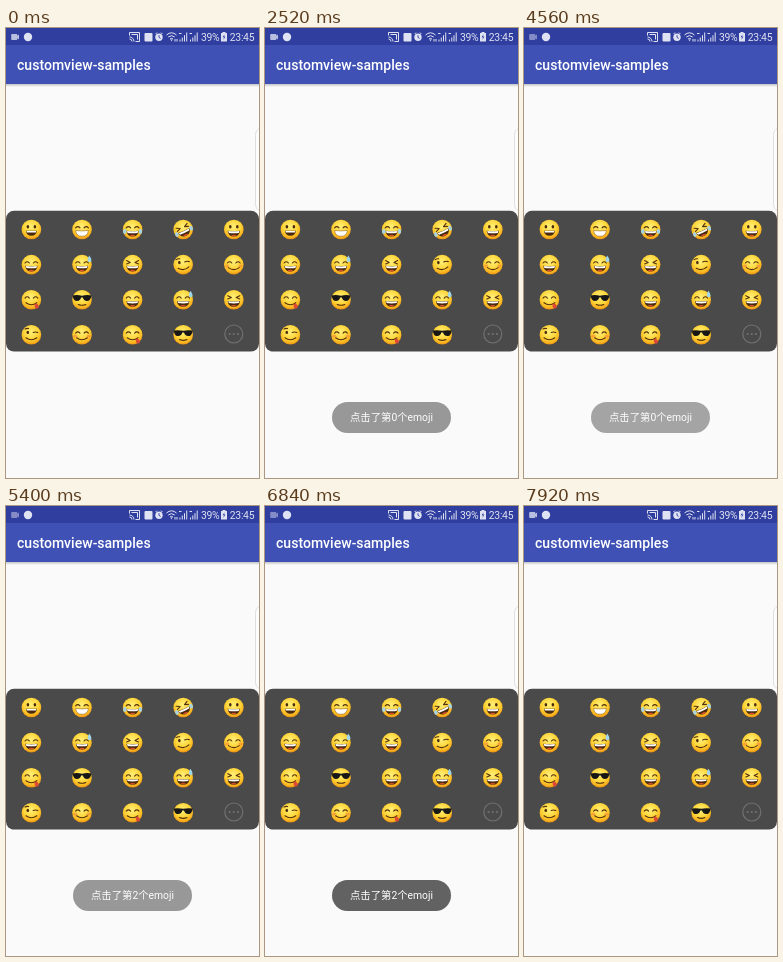
These frames come from a looping animation (253x450 px, 8000 ms). An HTML page:

```html
<!DOCTYPE html>
<html lang="zh">
<head>
<meta charset="utf-8">
<style>
html, body { margin: 0; width: 100%; height: 100%; overflow: hidden; background: #fafafa; }
svg { display: block; width: 253px; height: 450px; font-family: Roboto, "Noto Sans CJK SC", "Noto Sans CJK", sans-serif; }
.line { fill: none; stroke: #55300c; stroke-width: 1.1; stroke-linecap: round; stroke-linejoin: round; }
.clock { font-size: 10.4px; letter-spacing: -.3px; }
</style>
</head>
<body>
<svg viewBox="0 0 253 450">
  <defs>
    <radialGradient id="skin" cx=".48" cy=".36" r=".68">
      <stop offset="0" stop-color="#fff07a"/>
      <stop offset=".55" stop-color="#fdd437"/>
      <stop offset=".82" stop-color="#f8b01d"/>
      <stop offset="1" stop-color="#df7a0c"/>
    </radialGradient>
    <linearGradient id="shadow" x2="0" y2="1">
      <stop offset="0" stop-color="#000" stop-opacity=".22"/>
      <stop offset="1" stop-color="#000" stop-opacity="0"/>
    </linearGradient>
  </defs>
  <rect width="253" height="450" fill="#fafafa"/>
  <rect y="56" width="253" height="3" fill="url(#shadow)"/>
  <rect width="253" height="56" fill="#3f51b5"/>
  <rect width="253" height="17" fill="#303f9f"/>
  <text x="11" y="42" font-size="14.06" font-weight="500" fill="#fff">customview-samples</text>

  <g fill="#dfe2f2">
    <path id="camera" d="M6 6h4.5q.8 0 .8.8v1L13 6.6v4.8l-1.7-1.2v1q0 .8-.8.8H6q-.8 0-.8-.8V6.8Q5.2 6 6 6z"/>
    <circle cx="22" cy="9" r="4.2"/>
    <g fill="none" stroke="#dfe2f2">
      <path d="M123.5 7.5v-3h10v9h-4M123.5 9a4.5 4.5 0 0 1 4.5 4.5M123.5 11a2.5 2.5 0 0 1 2.5 2.5M125.5 6.5h6v5"/>
      <path d="M160.5 7q5-4.4 10 0M162.3 9q3.2-2.7 6.4 0M164 11q1.5-1.2 3 0"/>
      <path d="M149.6 6l1.4-1.4M156.4 6L155 4.6"/>
    </g>
    <rect x="138.5" y="5" width="8" height="8.5" rx="1"/>
    <circle cx="153" cy="9.2" r="3.7"/>
    <path d="M153 7.2v2.2l1.6 1" fill="none" stroke="#303f9f" stroke-width=".9"/>
    <path d="M164.6 11.5h1.8l-.9 2zM168.5 11h1v2.5h-1zM170.5 11h1v2.5h-1z"/>
    <path id="bars" d="M173.5 11.5h1v2h-1zM175.8 9.5h1v4h-1zM178 7.2h1v6.3h-1zM180.2 4.5h1v9h-1zM173 5h2.5v1H173z"/>
    <use href="#bars" x="10.5"/>
    <text class="clock" x="195" y="13">39%</text>
    <path d="M216.5 4h3v1h1.5v8.5h-6V5h1.5z"/>
    <path d="M218.6 6.3l-2 3h1.4l-.6 2.8 2-3.6H218z" fill="#303f9f"/>
    <text class="clock" x="223.8" y="13">23:45</text>
  </g>

  <path d="M254 100.5q-4.5 1-4.5 7v68q0 6 4.5 7" fill="#fdfdfd" stroke="#dedede"/>
  <rect y="182.8" width="253" height="140.7" rx="8" fill="#4a4a4a"/>
  <g id="faces"></g>
  <g fill="#717171">
    <circle cx="227.8" cy="306" r="9" fill="none" stroke="#717171" stroke-width="1.2"/>
    <circle cx="223.6" cy="306" r="1.1"/><circle cx="227.8" cy="306" r="1.1"/><circle cx="232" cy="306" r="1.1"/>
  </g>

  <g id="toast">
    <rect x="67" y="374" width="119" height="31" rx="15.5" fill="#626262"/>
    <text id="message" x="126.5" y="393.4" text-anchor="middle" font-size="10.35" fill="#fff"></text>
  </g>
</svg>
<script>
const $ = id => document.getElementById(id);
const line = d => `<path class="line" d="${d}"/>`;
const shape = (d, fill) => `<path d="${d}" fill="${fill}"/>`;
const oval = (x, y, rx, ry, fill) => `<ellipse cx="${x}" cy="${y}" rx="${rx}" ry="${ry}" fill="${fill}"/>`;
const pair = (x, y, rx, ry, fill) => oval(-x, y, rx, ry, fill) + oval(x, y, rx, ry, fill);
const tilt = (angle, face) => `<g transform="rotate(${angle})">${face}</g>`;
const ink = '#4b2a0c';

const dots = pair(3.5, -2.7, 1.3, 1.8, ink);
const arcs = line('M-6.4-1.6q2.2-2.6 4.4 0M2-1.6q2.2-2.6 4.4 0');
const squint = line('M-6-4l3.6 1.9-3.6 1.4M6-4l-3.6 1.9 3.6 1.4');
const wink = oval(-3.6, -2.4, 1.3, 1.6, ink) + line('M1.8-2.4q2.2-1 4.6.2M-6.4-5.8q1.8-1 3.6-.4');
const shades = shape('M-9.6-4.2Q-5-5.2 0-4 5-5.2 9.6-4.2L9-2.4Q8.2 1.2 5 1.2 1.6 1.2.9-2.2H-.9Q-1.6 1.2-5 1.2-8.2 1.2-9-2.4z', '#171717');

const open = shape('M-6.2 1.2Q0 2 6.2 1.2 5.6 7 0 7T-6.2 1.2z', ink)
  + shape('M-5.6 1.5Q0 2.2 5.6 1.5L5 3.4Q0 4-5 3.4z', '#fff') + oval(0, 6, 2.6, .8, '#d9502f');
const small = shape('M-5.6 1.2H5.6Q4.8 6.2 0 6.2T-5.6 1.2z', ink) + shape('M-5 1.4H5l-.5 1.7h-9z', '#fff');
const teeth = `<path d="M-6.4 1Q0 1.8 6.4 1 5.8 6.8 0 6.8T-6.4 1z" fill="#fff" stroke="#a0661c" stroke-width=".6"/>`;
const smile = line('M-5.4 3q5.4 4 10.8 0');

const blush = pair(6.6, 1.4, 2, 1.4, '#f5843c99');
const tears = pair(7.8, 2, 1.7, 2.4, '#a5d3e2');
const sweat = shape('M7.2-9q2.8 3.8 2 5.6-1.8 1.8-3.4 0-.7-2.1 1.4-5.6z', '#9fd6ec');
const tongue = shape('M3 4.4Q4.8 3 6.4 4.8q2 2.8 0 3.8-2.1.8-3-1.4z', '#dc4a35');

const happy = arcs + open;
const nervous = happy + sweat;
const laugh = squint + open;
const winking = wink + smile;
const shy = arcs + smile + blush;
const yummy = arcs + smile + tongue;
const cool = shades + line('M-3.8 4.8q3.8 1.6 7.6 0');

const faces = [
  dots + small, arcs + teeth, happy + tears, tilt(-24, laugh + tears), dots + open,
  happy, nervous, laugh, tilt(-7, winking), shy,
  yummy, cool, happy, nervous, laugh,
  winking, shy, yummy, cool
];
$('faces').innerHTML = faces.map((face, i) =>
  `<g transform="translate(${25.4 + i % 5 * 50.6} ${201.5 + Math.floor(i / 5) * 35.1})">
    <circle r="9.8" fill="url(#skin)"/>${face}</g>`).join('');

const toasts = [
  { start: 2320, end: 4230, index: 0 },
  { start: 5200, end: 7240, index: 2 }
];
const fade = 500;
const clamp = v => Math.max(0, Math.min(1, v));

function draw(now) {
  const t = now % 8000;
  const toast = toasts[t < 5000 ? 0 : 1];
  const fadeIn = 1 - (1 - clamp((t - toast.start) / fade)) ** 2;
  const fadeOut = 1 - clamp((t - toast.end) / fade) ** 2;
  $('toast').setAttribute('opacity', fadeIn * fadeOut);
  $('message').textContent = `点击了第${toast.index}个emoji`;
  const blink = t % 800;
  $('camera').setAttribute('opacity', blink > 320 && blink < 680 ? .48 : .78);
}

const origin = performance.now();
function tick() {
  draw(performance.now() - origin);
  requestAnimationFrame(tick);
}
tick();
</script>
</body>
</html>
```
